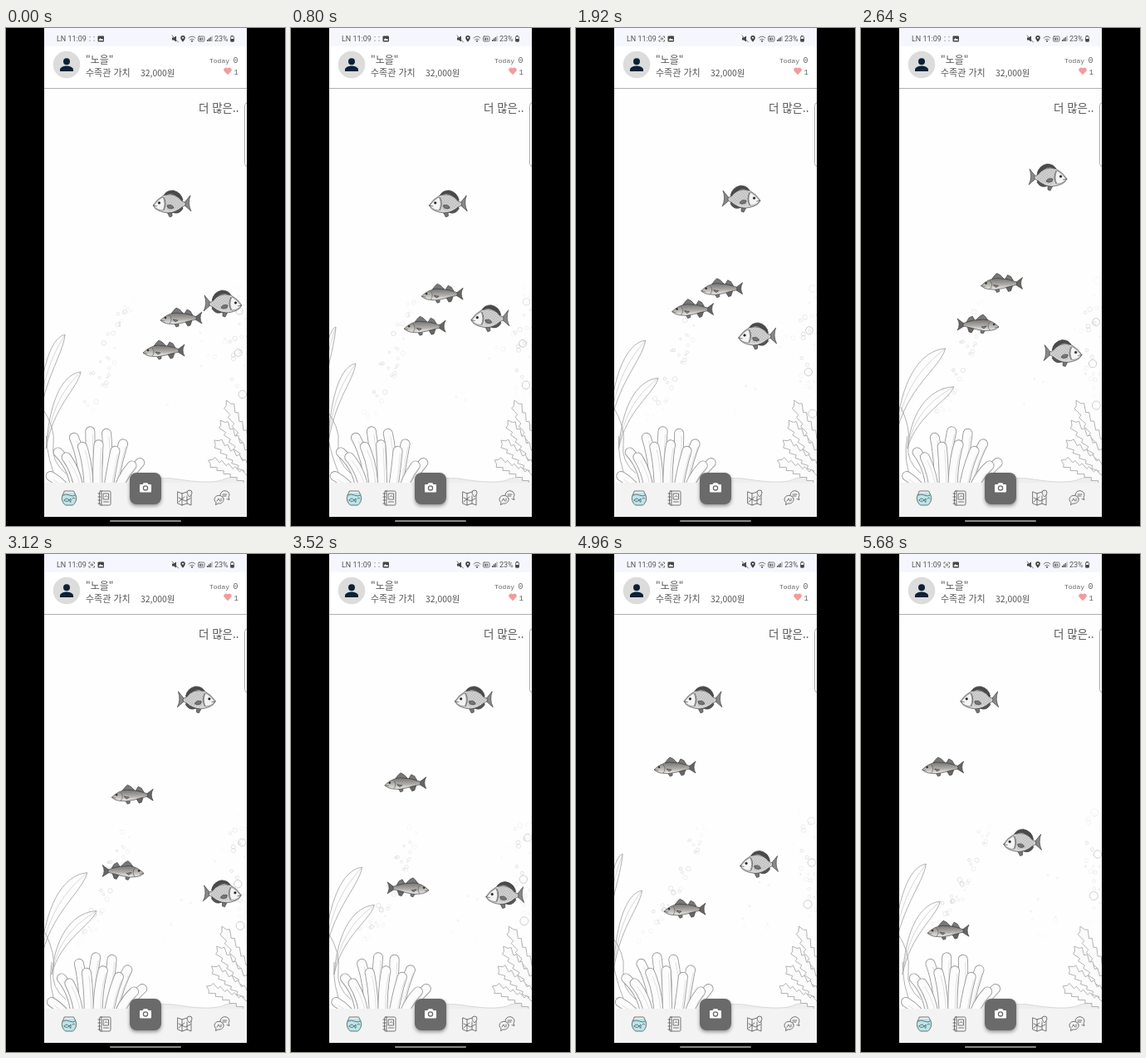
These frames come from a looping animation (336 px wide and 598 px high, 5.76 s). An HTML page:

```html
<!DOCTYPE html>
<html lang="ko">
<head>
<meta charset="utf-8">
<title>Aquarium</title>
<style>
html, body { margin: 0; width: 100%; height: 100%; overflow: hidden; background: #000; }
svg { display: block; width: 100%; height: 100%; }
.kr { font-family: "Noto Sans CJK KR", "Noto Sans CJK", sans-serif; font-weight: 300; fill: #555; }
.ui { font-family: Roboto, sans-serif; font-size: 9px; fill: #555; }
.mono { font-family: "Liberation Mono", monospace; fill: #666; }
.line { fill: none; stroke: #555; stroke-width: .8; stroke-linejoin: round; stroke-linecap: round; }
</style>
</head>
<body>
<svg viewBox="0 0 336 598" xmlns="http://www.w3.org/2000/svg">
  <defs>
    <clipPath id="panel"><rect x="46" y="0" width="244" height="587"/></clipPath>
    <filter id="shade" x="-40%" y="-40%" width="180%" height="190%">
      <feDropShadow dx="0" dy="2" stdDeviation="2" flood-color="#000" flood-opacity=".4"/>
    </filter>
    <linearGradient id="back" x1="0" y1="0" x2="0" y2="1">
      <stop offset="0" stop-color="#777"/><stop offset=".5" stop-color="#b4b0ab"/><stop offset="1" stop-color="#ececec"/>
    </linearGradient>
    <pattern id="scales" width="2.4" height="2.4" patternUnits="userSpaceOnUse" patternTransform="rotate(35)">
      <path d="M0 1.2H2.4M1.2 0V2.4" stroke="#555" stroke-width=".3" opacity=".45"/>
    </pattern>

    <g id="bream" stroke="#333" stroke-width=".6" stroke-linejoin="round">
      <path d="M-10-10 Q-7-16 1-16 Q11-14 13-4 L11-3 Q5-12-3-12Z" fill="#4a4a4a"/>
      <path d="M0 10 Q8 14 13 6 L12 3 L3 9Z" fill="#555"/>
      <path d="M-6 10 L-3 16 L0 15 L0 10Z" fill="#777"/>
      <path d="M15-1.500 L22-10 Q18.500 0 23 9 L15 2Z" fill="#888"/>
      <path d="M-23 2 Q-18-6-10-10 Q4-14 12-3 L16-1.500 L16 2 L12 4 Q4 11-5 11 Q-15 10-20 6Z" fill="#d6d6d6"/>
      <path d="M-9-10 Q4-13 12-3 L16-1 L12 3 Q4 9-6 8 Q-9 0-9-10Z" fill="url(#scales)" stroke="none"/>
      <path d="M-22 2 Q-17-5-11-8 Q-7 0-11 8 Q-16 8-20 5Z" fill="#f4f4f4" stroke-width=".4"/>
      <path d="M-10-8 Q-6 0-10 8M-23 2 L-18 3" fill="none"/>
      <path d="M-6 2 Q0 0 2 5 Q-1 7-5 5Z" fill="#777"/>
      <circle cx="-15.5" cy="-1" r="1.3" fill="#222"/>
    </g>

    <g id="bass" stroke="#333" stroke-width=".6" stroke-linejoin="round">
      <path d="M-12-5 L-9-9 L-6-12 L-2-10 L3-5Z" fill="#777"/>
      <path d="M4-5 L7-10 L11-8 L14-3Z" fill="#777"/>
      <path d="M5 5 L8 10 L11 9 L13 3Z" fill="#666"/>
      <path d="M-9 6 L-6 11 L-3 10 L-3 6Z" fill="#777"/>
      <path d="M17-1 L25-7 Q21 0 25 7 L17 2Z" fill="#666"/>
      <path d="M-25 3 Q-17-5-7-6 Q6-6 18-1.500 L18 2 Q8 4 2 6 Q-8 9-17 7 Q-22 6-25 3Z" fill="url(#back)"/>
      <path d="M-13-4 Q4-7 18-1 L18 1 Q4 3-11 4Z" fill="url(#scales)" stroke="none"/>
      <path d="M-14-3 Q-10 2-14 7M-25 3 L-20 4" fill="none" stroke-width=".5"/>
      <path d="M-10 2 L-4 3 L-7 5Z" fill="#888"/>
      <circle cx="-19" cy="0" r="1" fill="#222"/>
    </g>
  </defs>

  <rect width="336" height="598" fill="#000"/>
  <g clip-path="url(#panel)">
    <rect x="46" width="244" height="587" fill="#fefefe"/>
    <g id="bubbles" fill="none" stroke="#bbb" stroke-width=".8"></g>
    <path d="M140 548 Q185 536 215 543 Q252 548 264 541 Q280 537 292 542 V550 H140Z" fill="#eee" stroke="#ccc" stroke-width=".7"/>
    <g id="weeds" fill="#fdfdfd" stroke="#a8a8a8" stroke-width=".9" stroke-linejoin="round"></g>
    <g id="reef" fill="#fbfbfb" stroke="#aaa" stroke-width=".9" stroke-linejoin="round"></g>
    <g id="coral" fill="none" stroke-linecap="round"></g>
    <g id="fishes"></g>

    <rect x="46" width="244" height="22" fill="#f6f7fe"/>
    <text class="ui" x="61" y="16">LN 11:09</text>
    <g id="scan" class="line"></g>
    <rect x="110.5" y="9.5" width="7.5" height="7" rx="1" fill="#444"/>
    <path d="M111.5 15 l2-3 1.5 1.7 1-1 1.3 2.3Z" fill="#fff"/>
    <path d="M200 11.5h2l3-2v7l-3-2h-2zM213 9a2.8 2.8 0 0 0-2.8 2.8c0 2 2.8 5 2.8 5s2.8-3 2.8-5A2.8 2.8 0 0 0 213 9z" fill="#444"/>
    <path class="line" d="M200 9 l7.5 8M220 12 q4-4 8 0M221.6 14 q2.4-2 4.8 0"/>
    <circle cx="213" cy="11.8" r="1" fill="#fff"/><circle cx="224" cy="15.7" r="1" fill="#444"/>
    <rect class="line" x="231.5" y="10" width="7.5" height="6" rx="1.2"/>
    <path class="line" d="M233.3 12v2.5M233.3 13.2h1.4M234.7 12v2.5M236.3 12v2.5q2-1.2 0-2.5"/>
    <path d="M242 16v-2h1.2v2zM243.8 16v-3.5h1.2v3.5zM245.6 16v-5h1.2v5z" fill="#444"/>
    <path d="M247.4 16v-6.5h1.2v6.5z" fill="#aaa"/>
    <text class="ui" x="251" y="16">23%</text>
    <rect class="line" x="270.5" y="10" width="4" height="6.5" rx=".8"/>
    <path d="M271.5 9h2v1h-2zM270.5 13h4v3h-4z" fill="#444"/>

    <rect x="46" y="22" width="244" height="50" fill="#fff"/>
    <path d="M46 72.5H290" stroke="#b0b0b0"/>
    <circle cx="73" cy="44" r="16.3" fill="#dcdcdc"/>
    <circle cx="73" cy="40.3" r="4" fill="#0d2135"/>
    <path d="M65 52v-2c0-3.300 5.300-4.500 8-4.500s8 1.200 8 4.500v2z" fill="#0d2135"/>
    <text class="kr" x="96" y="43" font-size="12">"노을"</text>
    <text class="kr" x="96" y="58" font-size="11">수족관 가치</text>
    <text class="kr" x="162" y="58" font-size="10.4">32,000원</text>
    <text class="mono" x="245" y="41.5" font-size="8">Today</text>
    <text class="mono" x="273.5" y="42" font-size="10">0</text>
    <text class="mono" x="274.5" y="55.5" font-size="9">1</text>
    <path d="M267 56.2 l-4-4.1a2.6 2.6 0 0 1 4-3.6a2.6 2.6 0 0 1 4 3.6z" fill="#f39a9d"/>
    <text class="kr" x="232" y="101" font-size="13.5">더 많은..</text>
    <rect x="287.5" y="89.5" width="20" height="77" rx="4" fill="#fff" stroke="#aaa"/>

    <rect x="46" y="546" width="244" height="41" fill="#f3f3f3"/>
    <path d="M69.5 558h13q4.5 7 0 13l-2 2h-9l-2-2q-4.5-6 0-13z" fill="#b9e6ea"/>
    <path class="line" d="M70.5 556h11l1 2q4.5 7 0 13l-2 2h-9l-2-2q-4.5-6 0-13zM68.5 561q4-2 8 0t7 0M70 567q3-4 6 0q-3 3-6 0M76 567l2-2v4zM80 565q2-2 3 0"/>
    <rect class="line" x="112.5" y="556" width="13.5" height="17" rx="1.5"/>
    <path class="line" d="M115 556v17M111 559h3M111 563h3M111 567h3M111 571h3M117.5 559h6v7h-6zM117.5 569h6M119 563q2-3 3 0"/>
    <path class="line" d="M207 557l5 2 6-2 5 3v13l-5-2-6 2-5-2zM212 559v14M218 562v9M208 564l8 4 6-3M208 569l7-6"/>
    <path d="M221 555a3 3 0 0 0-3 3c0 2 3 5 3 5s3-3 3-5a3 3 0 0 0-3-3z" fill="#eee" stroke="#555" stroke-width=".8"/>
    <path class="line" d="M258 561a5.5 5 0 1 1 10 2.5l1 3-3-1M262 565a5.6 4.8 0 1 0-9 4.8l-.5 2.8 3-1.6a5.6 4.8 0 0 0 6.5-6M261 560h5M261 562h4M254 568l2-3 1.5 3M259 565v3"/>
    <rect x="149" y="534" width="38" height="38" rx="8" fill="#6a6a6a" filter="url(#shade)"/>
    <path d="M162 548h2.5l1.3-1.7h4.4l1.3 1.7h2.5q1 0 1 1v7.5q0 1-1 1h-12q-1 0-1-1V549q0-1 1-1z" fill="#fff"/>
    <circle cx="168" cy="552.4" r="2.6" fill="#fff" stroke="#6a6a6a" stroke-width="1.3"/>
  </g>
  <rect x="125" y="591" width="86" height="2" rx="1" fill="#888"/>
</svg>
<script>
const LOOP = 5760, STEP = 80, SWAY = 3900, SPEED = 51;
const $ = id => document.getElementById(id);
const lerp = (a, b, u) => a + (b - a) * u;

// Routes are compass headings with seconds; "-" rests, a very short leg just turns the fish.
const fishes = [
  { kind: 'bream', x: 202, y: 211, route: 'W.21 -1.55 NE1 -.66 W1.42 -.64 W.3' },
  { kind: 'bream', x: 259, y: 331, route: 'E.01 -.3 SW1.08 -.68 SE1.1 -.12 W.01 -.63 NW2' },
  { kind: 'bass', x: 211, y: 348, route: 'NW.98 -1.49 NW1.57 -1.24 W.5' },
  { kind: 'bass', x: 190, y: 387, route: 'NW1.37 -.9 E.01 S1.54 -.86 SW1.1' }
];
const unit = { N: [0, -1], S: [0, 1], W: [-1, 0], E: [1, 0] };
for (const f of fishes) {
  f.legs = f.route.split(' ').map(leg => {
    const [, head, time] = leg.match(/([NSWE-]+)(.+)/);
    const [dx, dy] = [...head].reduce(([x, y], c) => {
      const [ux, uy] = unit[c] || [0, 0];
      return [x + ux, y + uy];
    }, [0, 0]);
    const pace = SPEED / (Math.hypot(dx, dy) || 1);
    return { time: +time, dx, vx: dx * pace, vy: dy * pace };
  });
}
// The bream sits slightly ahead of its turning axis.
$('fishes').innerHTML = fishes.map(f => `<use href="#${f.kind}" x="${f.kind === 'bream' ? -2 : 0}"/>`).join('');
const fishNodes = [...$('fishes').children];

function swim(f, node, s) {
  let { x, y } = f, flip = 1;
  for (const leg of f.legs) {
    const d = Math.min(s, leg.time);
    x += leg.vx * d;
    y += leg.vy * d;
    if (leg.dx) flip = -leg.dx;
    s -= d;
    if (s <= 0) break;
  }
  node.setAttribute('transform', `translate(${x} ${y}) scale(${flip} 1)`);
}

let seed = 11;
const rnd = () => (seed = (seed * 16807) % 2147483647) / 2147483647;
const foam = Array.from({ length: 74 }, (_, i) => ({
  u: rnd(), dx: rnd() - .5, r: .8 + rnd() * 2, o: .2 + rnd() * .35, edge: i % 3 === 0, far: i % 5 === 0
}));

function drawBubbles(s) {
  const ring = (x, y, r, o) => `<circle cx="${x}" cy="${y}" r="${r}" opacity="${o}"/>`;
  const small = foam.map(b => {
    const u = (b.u + s / 11) % 1, fade = b.o * Math.min(1, 4 * u, 4 * (1 - u));
    if (b.edge) return ring(281 + b.dx * 22, lerp(450, 305, u), b.r, fade);
    if (b.far) return ring(lerp(205, 265, u) + b.dx * 50, lerp(470, 340, u), b.r, fade * .5);
    return ring(lerp(88, 154, u) + b.dx * 36 * (1 - u * .6), lerp(475, 318, u), b.r, fade);
  });
  const large = [0, 1, 2, 3].map(k => {
    const y = 490 - 50 * k - 14 * s;
    return ring(282 + 3 * Math.sin(2 * k + s), y, 5 - .3 * k, Math.max(0, Math.min(.9, (y - 295) / 60)));
  });
  $('bubbles').innerHTML = small.concat(large).join('');
}

// Crescent leaf from tip to root, with a vein.
function blade(tx, ty, bx, by) {
  const p = (a, b) => `${lerp(bx, tx, a)} ${lerp(ty, by, b)}`;
  return `<path d="M${tx} ${ty}C${p(.55, .02)} ${p(.1, .3)} ${bx} ${by}C${p(.2, .45)} ${p(.9, .22)} ${tx} ${ty}Z"/>` +
    `<path d="M${tx} ${ty}C${p(.72, .13)} ${p(.15, .37)} ${bx} ${by}" fill="none" opacity=".5"/>`;
}

function drawWeeds(s) {
  $('weeds').innerHTML = blade(78 + 24 * s, 372 + 13 * s, 38 + 4 * s, 490) +
    blade(95 + 17 * s, 417 + 14 * s, 50 + 6 * s, 505) +
    `<path d="M${44 + 4 * s} 455Q60 480 57 500T72 535M${50 + 6 * s} 490Q50 520 62 545" fill="none"/>`;
}

// A fan of curved fingers; every second one stands behind.
const FINGERS = 12;
const fan = Array.from({ length: FINGERS }, (_, i) => {
  const u = i / (FINGERS - 1), back = i % 2;
  return { x: lerp(54, 162, u), y: 479 + 38 * (2 * u - 1) ** 2 + (back ? 0 : 16), bend: 14 * (rnd() - .5), back };
}).sort((a, b) => b.back - a.back);

function drawCoral(s) {
  $('coral').innerHTML = fan.map(({ x, y, bend }) => {
    const tx = x + 6 * s * (546 - y) / 65, root = lerp(108, x, .55);
    const d = `M${root} 564Q${lerp(root, x, .3) + bend} ${lerp(564, y, .55)} ${tx} ${y + 5}`;
    const stroke = (color, w) => `<path d="${d}" stroke="${color}" stroke-width="${w}"/>`;
    return stroke('#999', 12) + stroke('#fcfcfc', 10.2) +
      `<path d="${d}" stroke="#d5d5d5" stroke-width=".7" transform="translate(3 4)"/>`;
  }).join('');
}

// Jagged branch: saw-tooth edges down both sides of a tapering stem.
function branch(x, y, rx, ry) {
  const len = Math.hypot(rx - x, ry - y), nx = (ry - y) / len, ny = (x - rx) / len, n = 14;
  const edge = side => Array.from({ length: n }, (_, i) => {
    const u = (i + 1) / n, w = side * (3 + (i % 2 ? 3.5 : 0) + u);
    return `${lerp(x, rx, u - (i % 2 ? .05 : 0)) + nx * w} ${lerp(y, ry, u - (i % 2 ? .05 : 0)) + ny * w}`;
  });
  return `<path d="M${x} ${y}L${edge(1).join('L')}L${edge(-1).reverse().join('L')}Z"/>`;
}

function drawReef(s) {
  $('reef').innerHTML = [0, 1, 2, 3].map(k =>
    branch(264 - 7 * k - (5 - k) * s, 447 + 24 * k, 300, 522 + 8 * k)).join('');
}

function drawScan(t) {
  const p = t / 860 % 1, wide = p < .22 || p > .78;
  $('scan').innerHTML = wide
    ? '<path d="M101 10.5v.4M106 10.5v.4M101 15v.4M106 15v.4"/>'
    : '<path d="M100 11.5v-1.5h1.5M105 10h1.5v1.5M106.5 14.5v1.5h-1.5M101.5 16h-1.5v-1.5"/><circle cx="103.3" cy="13" r="1.2"/>';
}

function draw(t) {
  const s = Math.sin(2 * Math.PI * (t - 1770) / SWAY);
  drawBubbles(t / 1000);
  drawWeeds(s);
  drawCoral(s);
  drawReef(s);
  drawScan(t);
  fishes.forEach((f, i) => swim(f, fishNodes[i], t / 1000));
}

const start = performance.now();
function tick() {
  const t = (performance.now() - start) % LOOP;
  draw(Math.floor(t / STEP) * STEP);
  requestAnimationFrame(tick);
}
tick();
</script>
</body>
</html>
```
